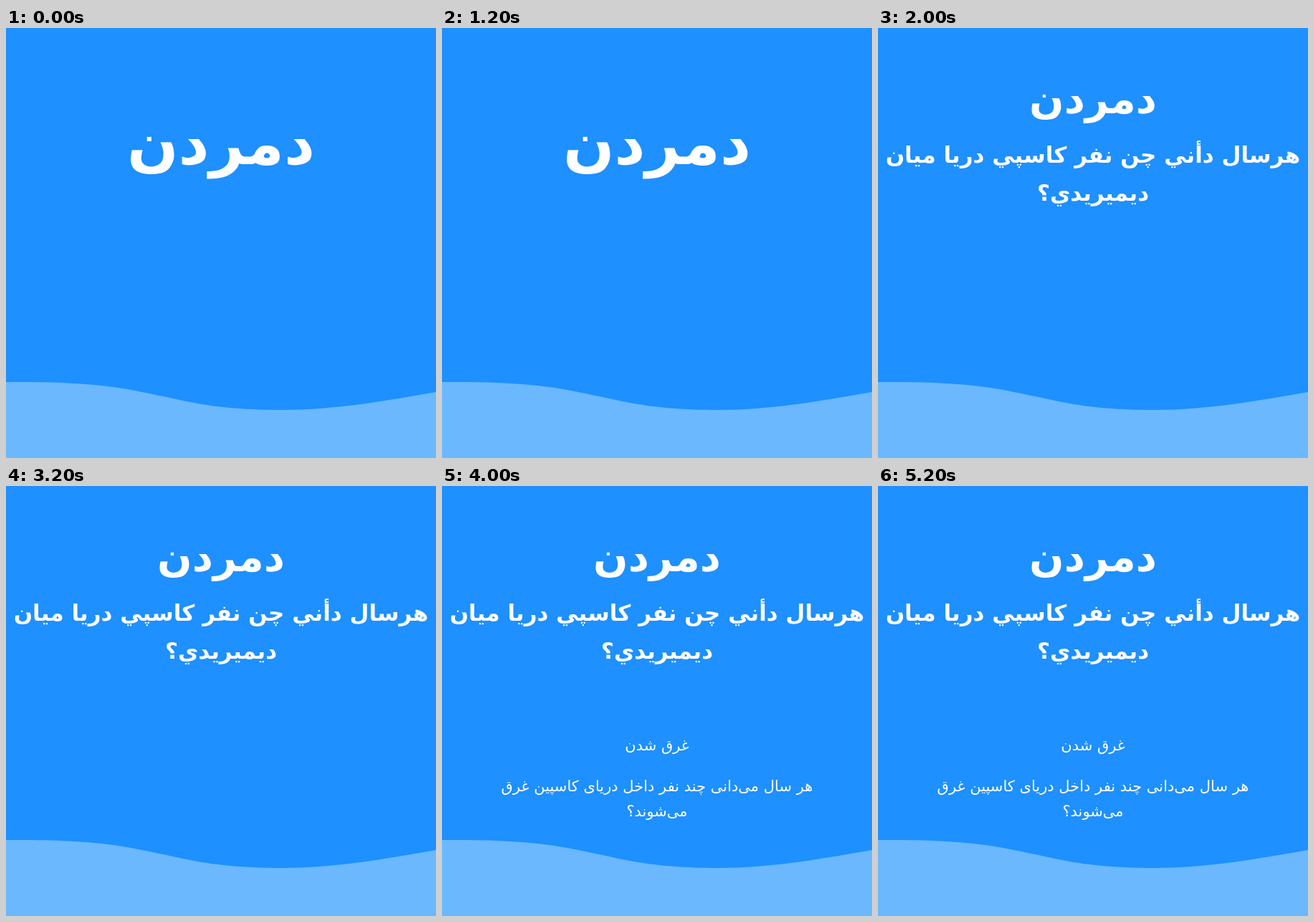
An HTML page with a canvas for the animation above (6 s loop, 600 by 600 pixels).

```html
<!DOCTYPE html>
<html lang="fa">
<head>
<meta charset="utf-8">
<style>
html, body { margin: 0; width: 100%; height: 100%; overflow: hidden; background: #1e90ff; }
canvas { display: block; }
</style>
</head>
<body>
<canvas id="stage" width="600" height="600"></canvas>
<script>
const ctx = document.getElementById("stage").getContext("2d");
const LOOP = 6000;
const STEP = 2000;
const FAMILY = '"DejaVu Sans", "Noto Sans", sans-serif';

const heading = [
  ["هرسال دأني چن نفر کاسپي دريا ميان", 188],
  ["ديميريدي؟", 241],
];
const translation = [
  ["غرق شدن", 369],
  ["هر سال می\u200cدانی چند نفر داخل دریای کاسپین غرق", 426],
  ["می\u200cشوند؟", 461],
];

function write(text, y, size, weight) {
  ctx.font = `${weight} ${size}px ${FAMILY}`;
  ctx.fillText(text, 300, y);
}

function drawWave() {
  ctx.fillStyle = "#6bb8ff";
  ctx.beginPath();
  ctx.moveTo(0, 494);
  ctx.bezierCurveTo(100, 493, 150, 499, 200, 510);
  ctx.bezierCurveTo(250, 520, 290, 533, 385, 533);
  ctx.bezierCurveTo(460, 533, 530, 520, 600, 508);
  ctx.lineTo(600, 600);
  ctx.lineTo(0, 600);
  ctx.fill();
}

function draw(time) {
  const scene = Math.floor((time % LOOP) / STEP);
  ctx.fillStyle = "#1e90ff";
  ctx.fillRect(0, 0, 600, 600);
  drawWave();

  ctx.fillStyle = "#fff";
  ctx.textAlign = "center";
  ctx.direction = "rtl";
  if (scene === 0) {
    write("دمردن", 190, 84, "bold");
  } else {
    write("دمردن", 119, 57, "bold");
    for (const [text, y] of heading) write(text, y, 31, "bold");
  }
  if (scene === 2) {
    for (const [text, y] of translation) write(text, y, 21, "normal");
  }
}

const start = performance.now();
function tick() {
  draw(performance.now() - start);
  requestAnimationFrame(tick);
}
tick();
</script>
</body>
</html>
```
